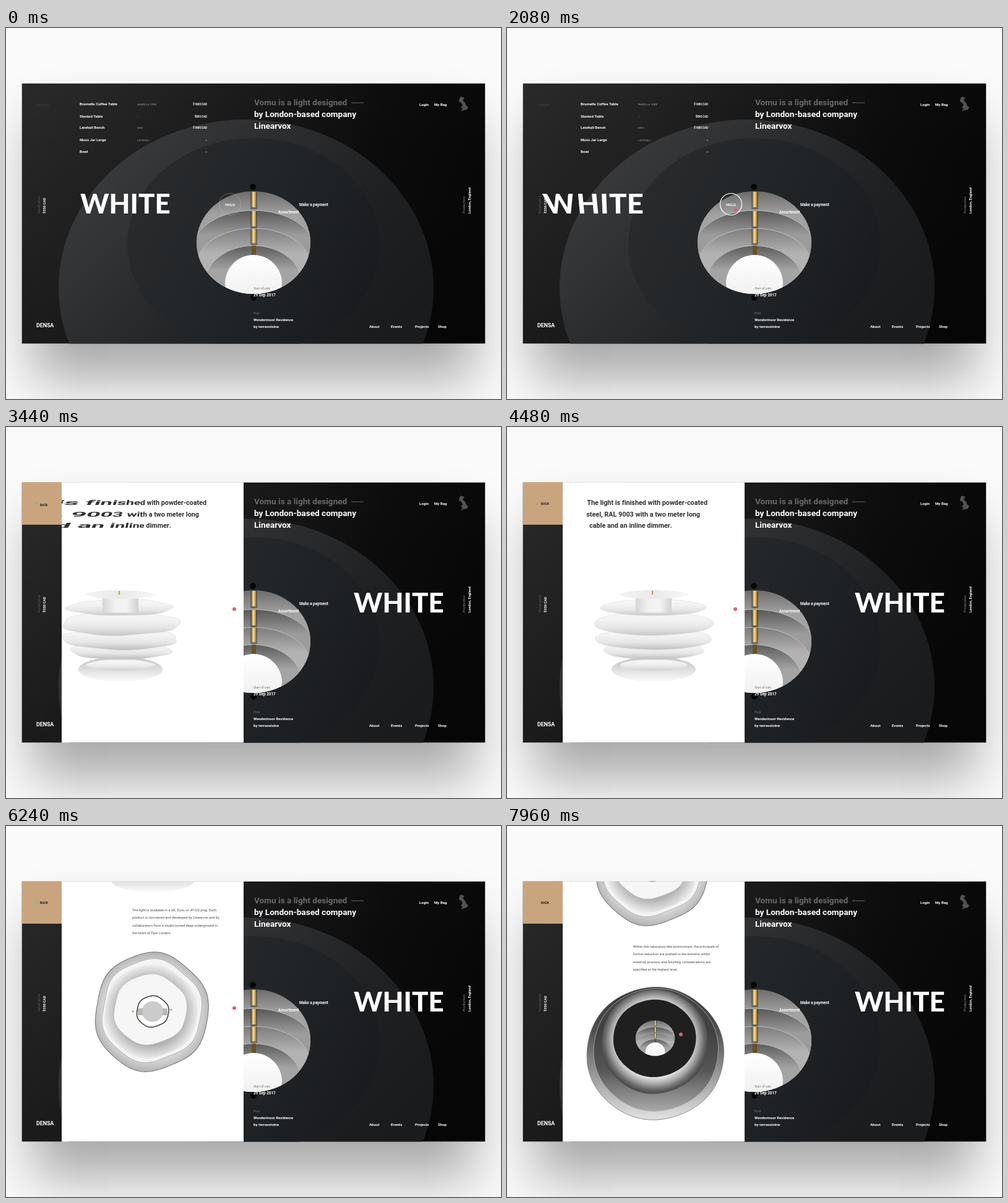
Write an HTML page with a canvas that moves like this. It is 800 px wide and 600 px high and loops after 8000 ms.

```html
<!DOCTYPE html>
<html lang="en">
<head>
<meta charset="utf-8">
<title>White lamp</title>
<style>
html, body { margin: 0; width: 100%; height: 100%; overflow: hidden; background: #fafafa; }
canvas { display: block; }
</style>
</head>
<body>
<canvas id="stage" width="800" height="600"></canvas>
<script>
const LOOP = 8000, TAU = Math.PI * 2;
const SCREEN = [25.5, 89.5, 749, 421];
const PANE = { left: 90, right: 384 };
const view = document.getElementById('stage').getContext('2d');
let g = view;

// easing and timing
const lerp = (a, b, p) => a + (b - a) * p;
const span = (t, from, to) => Math.min(1, Math.max(0, (t - from) / (to - from)));
const outQuad = p => 1 - (1 - p) ** 2;
const outCubic = p => 1 - (1 - p) ** 3;
const outQuart = p => 1 - (1 - p) ** 4;
const inOut = n => p => p < .5 ? 2 ** (n - 1) * p ** n : 1 - 2 ** (n - 1) * (1 - p) ** n;
const inOutCubic = inOut(3), inOutQuart = inOut(4);

// drawing helpers
function fade(x0, y0, x1, y1, ...colors) {
  const f = g.createLinearGradient(x0, y0, x1, y1);
  colors.forEach((c, i) => f.addColorStop(i / (colors.length - 1), c));
  return f;
}

function glow(x, y, r0, r1, ...colors) {
  const f = g.createRadialGradient(x, y, r0, x, y, r1);
  colors.forEach((c, i) => f.addColorStop(i / (colors.length - 1), c));
  return f;
}

function paint(fill, stroke, width = 1) {
  if (fill) { g.fillStyle = fill; g.fill(); }
  if (stroke) { g.strokeStyle = stroke; g.lineWidth = width; g.stroke(); }
}

function oval(x, y, rx, ry, fill, stroke, width) {
  g.beginPath();
  g.ellipse(x, y, rx, ry, 0, 0, TAU);
  paint(fill, stroke, width);
}

function blob(x, y, rx, ry, wave, phase, fill, stroke, width) {
  g.beginPath();
  for (let i = 0; i < 120; i++) {
    const a = i / 120 * TAU;
    const k = 1 + wave * (.4 * Math.sin(2 * a + phase) + .6 * Math.sin(3 * a + phase * 2) + .8 * Math.sin(6 * a + phase));
    g.lineTo(x + rx * k * Math.cos(a), y + ry * k * Math.sin(a));
  }
  g.closePath();
  paint(fill, stroke, width);
}

function box(x, y, w, h, fill) {
  g.fillStyle = fill;
  g.fillRect(x, y, w, h);
}

function setFont(size, weight = 700, family = 'Roboto') {
  g.font = `${weight} ${size}px ${family}, sans-serif`;
}

// y is the middle of the capitals
function label(s, x, y, size = 6.1, color = '#fff', { weight = 700, align = 'left', turn = 0 } = {}) {
  g.save();
  g.translate(x, y);
  g.rotate(turn);
  setFont(size, weight);
  g.textAlign = align;
  g.fillStyle = color;
  g.fillText(s, 0, size * .35);
  g.restore();
}

function aperture(x, y, scale) {
  g.save();
  g.translate(x, y);
  g.scale(scale, scale);
  g.beginPath();
  g.ellipse(0, 0, 92, 83, 0, 0, TAU);
  g.clip();
  box(-92, -83, 184, 166, fade(0, -83, 0, -45, '#6c6c6c', '#a2a2a2'));
  const bands = [
    [-52, 98, 62, '#585858', '#9c9c9c'],
    [-23, 92, 60, '#7c7c7c', '#b2b2b2'],
    [5, 78, 60, '#5c5c5c', '#a4a4a4']
  ];
  for (const [top, rx, ry, near, far] of bands)
    oval(0, top + ry, rx, ry, fade(0, top, 0, top + 40, near, far), '#bdbdbd', 1);
  const gold = fade(-4, 0, 4, 0, '#7d5513', '#ffe2a0', '#a87722');
  [[-82, 25], [-51, 25], [-22, 23]].forEach(([top, h]) => {
    box(-5, top, 11, h + 3, 'rgba(50,45,38,.45)');
    box(-3, top, 7, h, gold);
  });
  box(-3, 5, 7, 16, '#6b5024');
  oval(0, 66, 46, 46, fade(0, 20, 0, 83, '#fff', '#f1f1f1'));
  g.restore();
}

function drawBackdrop() {
  g.fillStyle = '#fafafa';
  g.fillRect(0, 0, 800, 600);
  g.save();
  g.shadowColor = 'rgba(0,0,0,.33)';
  g.shadowBlur = 80;
  g.shadowOffsetY = 60;
  box(44, 92, 712, 416, '#222');
  g.restore();

  g.save();
  g.beginPath();
  g.rect(...SCREEN);
  g.clip();
  box(...SCREEN, fade(26, 89, 774, 260, '#2a2a2b', '#232324', '#19191a', '#0d0d0e', '#080808'));
  box(...SCREEN, fade(0, 89, 0, 511, 'rgba(0,0,0,0)', 'rgba(0,0,0,.3)'));
  oval(388, 420, 303, 272, fade(180, 190, 560, 560, '#393a3c', '#2c2d2f', '#1f2022', '#1a1b1d'));
  oval(400, 350, 204, 172, fade(200, 240, 600, 440, '#292b2d', '#222527', '#181a1d'));
  oval(399, 257, 5, 5, '#070707');
  oval(400, 436, 5, 5, '#070707');
  aperture(400, 347, 1);

  const dim = '#606163';
  label('Category', 49, 124, 5, '#434345', { weight: 400 });
  const items = [
    ['Brumelle Coffee Table', 'MARELLA OSKE', '$1680 CAD', 123],
    ['Slanted Table', '–', '$890 CAD', 142.5],
    ['Latehall Bench', 'DRIV', '$1680 CAD', 161],
    ['Moss Jar Large', 'LATEHALL', '–', 181],
    ['Bowl', '–', '–', 199.5]
  ];
  for (const [name, maker, price, y] of items) {
    label(name, 119, y);
    label(maker, 212, y + .5, 4.3, '#77787a');
    label(price, 325, y + .5, 4.5, '#fff', { align: 'right' });
  }

  label('Vomu is a light designed', 401, 120.5, 13.6, '#68696c');
  box(558, 120.5, 20, 1, '#68696c');
  label('by London-based company', 401, 139.5, 13.6);
  label('Linearvox', 401, 158, 13.6);
  label('Login', 668, 123.5);
  label('My Bag', 692, 123.5);
  label('Make a payment', 474, 285.5, 6.3);
  label('Assortment', 440, 298, 6.3);
  label('Start of sale', 400, 421, 5, '#77787a', { weight: 400 });
  label('29 Sep 2017', 400, 431.5, 6.3);
  label('Post', 400, 461.5, 5, '#77787a', { weight: 400 });
  label('Wendermoor Residence', 400, 472, 6);
  label('by terravoisine', 400, 482.5, 6.2);
  label('About', 587, 482.5);
  label('Events', 622, 482.5);
  label('Projects', 661, 482.5);
  label('Shop', 698, 482.5);
  label('DENSA', 49, 480.5, 8.8);

  const up = { turn: -Math.PI / 2 };
  label('Retail price', 53, 300, 5.6, '#4b4b4d', up);
  label('$350 CAD', 62, 300, 5.6, '#fff', up);
  label('Production', 740, 300, 5.6, dim, up);
  label('London, England', 749, 300, 5.6, '#fff', up);

  // map of Britain
  const coast = [735, 111, 741, 113, 738, 117, 742, 121, 744, 126, 747, 128, 745, 132, 739, 133, 735, 135, 738, 130, 735, 129, 738, 125, 736, 121, 732, 119, 733, 114];
  g.beginPath();
  for (let i = 0; i < coast.length; i += 2) g.lineTo(coast[i], coast[i + 1]);
  g.closePath();
  paint('#515254');
  g.restore();
}

function drawHold(t) {
  oval(362, 285, 17.5, 17.5, null, 'rgba(190,190,190,.55)', .8);
  const p = inOutCubic(span(t, 900, 1700));
  if (p > 0) {
    g.beginPath();
    g.arc(362, 285, 17.5, -TAU / 4, -TAU / 4 + TAU * p);
    paint(null, '#fff', 1.2);
  }
  label('HOLD', 362, 285.5, 6.2, '#fff', { align: 'center' });
}

// The word stretches between its two ends; its first letters lean back while held.
function drawTitle(t) {
  const word = 'WHITE';
  const pull = outCubic(span(t, 900, 2080));
  const release = inOutCubic(span(t, 2140, 3000));
  const left = lerp(lerp(120, 64, pull), 562, release);
  const right = lerp(lerp(262, 217, pull), 704, inOutQuart(span(t, 2100, 2800)));
  const lean = .22 * pull * (1 - release);
  g.save();
  g.translate(left, 300);
  g.scale((right - left) / 142, 1);
  setFont(44, 800, 'Lato');
  g.fillStyle = '#fff';
  for (let i = 0; i < word.length; i++) {
    g.save();
    g.transform(1, 0, lean * .4 ** i, 1, g.measureText(word.slice(0, i)).width, 0);
    g.fillText(word[i], 0, 0);
    g.restore();
  }
  g.restore();
}

// Glyphs past a moving front are pulled away from their resting place.
function warp(lines, { edge, dir, front, size, weight, color }) {
  setFont(size, weight);
  g.fillStyle = color;
  const place = x => x + dir * .036 * Math.max(0, (x - edge) * dir - front) ** 2;
  for (const [text, start, y] of lines) {
    const base = y + size * .35;
    for (let i = 0; i < text.length; i++) {
      const x = start + g.measureText(text.slice(0, i)).width;
      const w = g.measureText(text[i]).width;
      const a = place(x), b = place(x + w), s = (b - a) / w;
      if (b < PANE.left || a > PANE.right || text[i] === ' ') continue;
      g.save();
      g.transform(s, 0, -Math.min(.8, .18 * (s - 1)), 1, a, base);
      g.fillText(text[i], 0, 0);
      g.restore();
    }
  }
}

function frontAt(t, start, end) {
  return lerp(-300, end, outQuad(span(t, start, start + 1200)));
}

function drawIntro(t, scroll) {
  setFont(10.8);
  const rows = [
    ['The light is finished with powder-coated', 324, 122.5],
    ['steel, RAL 9003 with a two meter long', 312, 141],
    ['cable and an inline dimmer.', 266, 159.5]
  ].map(([s, right, y]) => [s, right - g.measureText(s).width, y - scroll]);
  warp(rows, { edge: 324, dir: -1, front: frontAt(t, 2804, 210), size: 10.8, weight: 700, color: '#303030' });
}

function drawNote(t, start, x, y, rows) {
  warp(rows.map((s, i) => [s, x, y + i * 12.5]),
    { edge: x, dir: 1, front: frontAt(t, start, 160), size: 5.65, weight: 400, color: '#4c4c4c' });
}

function drawSideLamp(t, scroll) {
  const p = outCubic(span(t, 2800, 4140));
  const wave = .01 + .2 * (1 - p);
  g.save();
  g.translate(lerp(-130, 237, p), -scroll);
  oval(0, 392, 68, 20, fade(0, 372, 0, 412, '#c2c2c2', '#dedede', '#fbfbfb'));
  const disc = (y, rx, ry, i, dark) => blob(0, y, rx, ry, wave, i * 1.3,
    fade(0, y - ry, 0, y + ry, '#f7f7f7', '#f3f3f3', '#e6e6e6', dark), '#dadada', .6);
  disc(385, 54, 9, 6, '#cfcfcf');
  disc(361, 81, 15, 5, '#bcbcbc');
  disc(343, 95, 17, 4, '#c0c0c0');
  disc(318, 97, 19, 3, '#c8c8c8');
  disc(292, 85, 13, 2, '#c8c8c8');
  box(-29, 273, 58, 27, fade(-29, 0, 29, 0, '#d5d5d5', '#f1f1f1', '#f4f4f4', '#d0d0d0'));
  blob(0, 271, 55, 7, wave, 1, fade(-55, 0, 55, 0, '#f4f4f4', '#e9e9e9', '#f7f7f7'));
  box(-3, 265, 2, 6, '#c99a45');
  g.restore();
}

function drawTopLamp(t, scroll) {
  const p = outCubic(span(t, 4700, 5800));
  const wave = .024 + .03 * (1 - p), phase = 3.67;
  g.save();
  g.translate(lerp(-103, 235, p), 606 - scroll);
  blob(0, 0, 92, 95, wave, phase, glow(0, 0, 78, 96, '#d6d6d6', '#c6c6c6', '#b4b4b4'), '#7c7c7c', 1.1);
  blob(0, -2, 81, 82, wave * 1.3, phase, '#f4f4f4', '#a9a9a9', .8);
  blob(-1, -1, 76, 75, wave, phase, glow(-1, 0, 54, 78, '#b2b2b2', '#d2d2d2', '#f2f2f2'));
  blob(-2, -4, 59, 56, wave, phase, '#f6f6f6');
  blob(2, -1, 26, 25, wave, phase, '#fff', '#444', 1.6);
  box(-22, -6, 48, 11, '#b8b8b8');
  oval(2, -1, 17, 16, '#cbcbcb', '#aaa', .6);
  oval(-30, -1, 1.5, 1.5, '#c89636');
  oval(32, -4, 1.5, 1.5, '#c89636');
  g.restore();
}

function drawDarkLamp(t, scroll) {
  const enter = span(t, 6600, 7700), grown = outQuad(enter);
  if (!enter) return;
  const wave = .005 + .11 * (1 - grown), scale = lerp(.475, 1, grown), phase = 3.67;
  g.save();
  g.translate(lerp(-71, 239.5, outQuart(enter)), 909 - scroll);
  g.scale(scale, scale);
  blob(0, 0, 111, 107, wave, phase, fade(0, -107, 0, 107, '#343434', '#505050', '#9a9a9a', '#e2e2e2'), '#777', .8);
  blob(1, -6, 101, 99, wave, phase, fade(0, -105, 0, 93, '#4a4a4a', '#404040', '#565656', '#a8a8a8'), '#b0b0b0', .8);
  blob(-1, -19, 86, 84, wave, phase, glow(-1, -22, 62, 90, '#dedede', '#a6a6a6', '#666', '#3b3b3b'));
  blob(-1, -24.5, 67, 62.5, wave, phase, '#1f1f20');
  aperture(0, -25, .345);
  g.restore();
}

function drawPane(t) {
  const open = inOutQuart(span(t, 2200, 3000));
  if (!open) return;
  g.save();
  g.beginPath();
  g.rect(PANE.left, 89, (PANE.right - PANE.left) * open, 422);
  g.clip();
  box(PANE.left, 89, PANE.right - PANE.left, 422, '#fff');
  const scroll = 305 * inOutQuart(span(t, 4400, 5500)) + 236 * inOutQuart(span(t, 6360, 7200));
  drawSideLamp(t, scroll);
  drawTopLamp(t, scroll);
  drawDarkLamp(t, scroll);
  drawIntro(t, scroll);
  drawNote(t, 4680, 204, 441 - scroll, [
    'The light is available in a UK, Euro, or JP/US plug. Each',
    'product is conceived and developed by Linearvox and its',
    'collaborators from a studio buried deep underground in',
    'the heart of East London.'
  ]);
  drawNote(t, 6404, 203.5, 736 - scroll, [
    'Within this laboratory-like environment, the principals of',
    'formal reduction are pushed to the extreme whilst',
    'material, process, and finishing considerations are',
    'specified at the highest level.'
  ]);
  g.restore();
}

function drawBack(t) {
  const drop = inOutCubic(span(t, 2400, 3000));
  if (!drop) return;
  box(25.5, 89, 64.5, 69 * drop, '#c9a57f');
  const p = outCubic(span(t, 3000, 3900));
  if (!p) return;
  label('‹', 49, 123.5, 5, '#7d6347');
  label('BACK', 55, lerp(140, 124, p), lerp(3, 5, p), '#1f1a15');
}

function drawCursor(t) {
  const come = inOutCubic(span(t, 60, 880)), go = inOutCubic(span(t, 7600, 7960));
  if (!come) return;
  oval(lerp(lerp(790, 369, come), 281, go), lerp(lerp(518, 294.5, come), 337, go), 3, 3, '#d9646b');
}

const backdrop = document.createElement('canvas');
backdrop.width = 800;
backdrop.height = 600;
g = backdrop.getContext('2d');
drawBackdrop();
g = view;

function frame() {
  const t = performance.now() % LOOP;
  g.drawImage(backdrop, 0, 0);
  g.save();
  g.beginPath();
  g.rect(...SCREEN);
  g.clip();
  drawHold(t);
  drawTitle(t);
  drawPane(t);
  drawBack(t);
  drawCursor(t);
  g.restore();
  requestAnimationFrame(frame);
}
frame();
</script>
</body>
</html>
```
